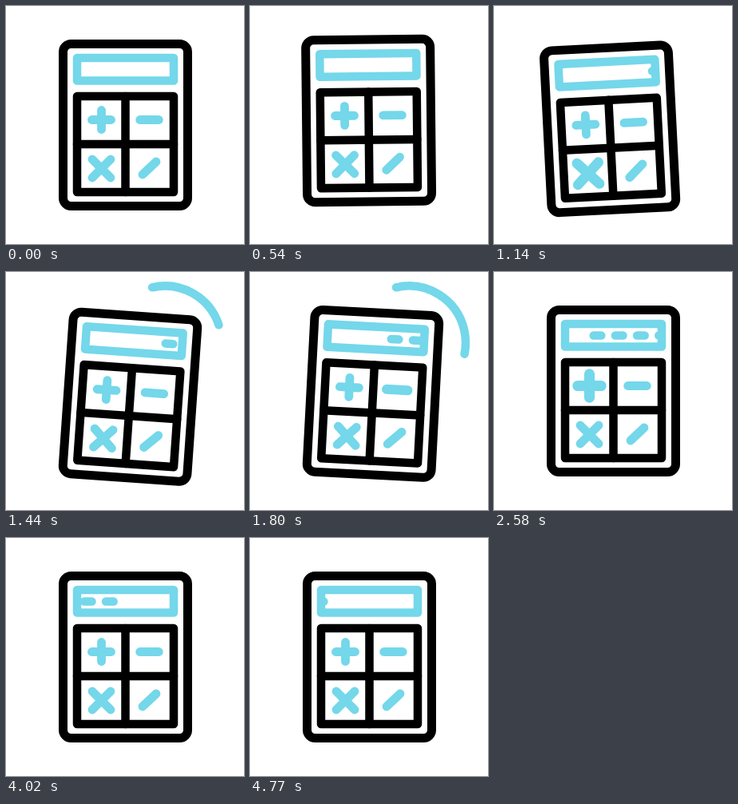
An HTML page with a canvas that plays this animation: 298x298 px, repeating every 5190 ms.

```html
<!DOCTYPE html>
<html lang="en">
<head>
<meta charset="utf-8">
<title>Calculator</title>
<style>
html, body { margin: 0; width: 100%; height: 100%; overflow: hidden; background: #fff; }
canvas { display: block; width: 298px; height: 298px; }
</style>
</head>
<body>
<canvas id="stage" width="298" height="298"></canvas>
<script>
const ctx = document.getElementById('stage').getContext('2d');
const LOOP = 5190, STEP = 30;
const CYAN = '#74d7ea', BLACK = '#000';
const PIVOT = { x: 149.5, y: 235 };

// [time, value] pairs
const TILT = [[360, 0], [840, -2.8], [980, -4], [1140, -2.9], [1440, 4], [1520, 4.7], [1800, 3], [1980, 1], [2130, 0]];
const LIFT = [[360, 0], [840, -21.5], [920, -23.5], [1140, 4.7], [1260, 6], [1480, 7], [1800, 3.3], [1980, 0.8], [2130, 0]];

const clamp = v => Math.max(0, Math.min(1, v));
const ease = v => v * v * (3 - 2 * v);
const progress = (t, from, to) => ease(clamp((t - from) / (to - from)));
const pulse = (t, peak, gain) => 1 + gain * (1 + Math.cos(Math.PI * Math.min(1, Math.abs(t - peak) / 230))) / 2;

// Slope at a key: flat at ends and extremes, harmonic mean elsewhere
function slope(keys, i) {
  if (i === 0 || i === keys.length - 1) return 0;
  const rate = k => (keys[k + 1][1] - keys[k][1]) / (keys[k + 1][0] - keys[k][0]);
  const a = rate(i - 1), b = rate(i);
  return a * b <= 0 ? 0 : 2 * a * b / (a + b);
}

function sample(keys, t) {
  const last = keys.length - 1;
  if (t <= keys[0][0]) return keys[0][1];
  if (t >= keys[last][0]) return keys[last][1];
  const i = keys.findIndex(k => k[0] > t) - 1;
  const [t0, v0] = keys[i], [t1, v1] = keys[i + 1];
  const span = t1 - t0, u = (t - t0) / span;
  return v0 + (v1 - v0) * ease(u)
    + span * u * (1 - u) * ((1 - u) * slope(keys, i) - u * slope(keys, i + 1));
}

function line(x1, y1, x2, y2) {
  ctx.beginPath();
  ctx.moveTo(x1, y1);
  ctx.lineTo(x2, y2);
  ctx.stroke();
}

function symbol(x, y, scale, draw) {
  ctx.save();
  ctx.translate(x, y);
  ctx.scale(scale, scale);
  draw();
  ctx.restore();
}

function drawBody() {
  ctx.strokeStyle = BLACK;
  ctx.lineWidth = 11;
  ctx.beginPath();
  ctx.roundRect(71.5, 47.5, 156, 203, 10);
  ctx.stroke();
  ctx.lineWidth = 10.5;
  ctx.strokeRect(89, 113, 121, 120);
  line(149.5, 113, 149.5, 233);
  line(89, 173, 210, 173);
}

function drawDisplay(t) {
  ctx.strokeStyle = CYAN;
  ctx.lineWidth = 10.5;
  ctx.save();
  ctx.beginPath();
  ctx.rect(93, 69, 113, 20);
  ctx.clip();
  const first = 129.5 - 0.0564 * (t - 2580);
  for (let i = 0; i < 4; i++) {
    const x = first + 27.2 * i;
    line(x - 4.8, 79.5, x + 4.8, 79.5);
  }
  ctx.restore();
  ctx.strokeRect(89, 65, 121, 28.5);
}

function drawSymbols(t) {
  ctx.lineWidth = 10.8;
  symbol(119.5, 142.5, pulse(t, 2570, 0.22), () => {
    line(-12, 0, 12, 0);
    line(0, -12, 0, 12);
  });
  symbol(179.5, 142.5, pulse(t, 1780, 0.12), () => line(-11.8, 0, 11.8, 0));
  symbol(119.5, 203.5, pulse(t, 1080, 0.2), () => {
    line(-11.5, -11.5, 11.5, 11.5);
    line(11.5, -11.5, -11.5, 11.5);
  });
  symbol(179.5, 203, pulse(t, 3045, 0.2), () => line(-8.5, 8, 8.5, -8));
}

function drawSwoosh(t) {
  const from = -103, sweep = 114.5;
  const head = progress(t, 1200, 1560), tail = progress(t, 1830, 2130);
  if (head <= tail) return;
  const angle = part => (from + sweep * part) * Math.PI / 180;
  ctx.strokeStyle = CYAN;
  ctx.lineWidth = 10.5;
  ctx.beginPath();
  ctx.arc(199, 88.5, 71, angle(tail), angle(head));
  ctx.stroke();
}

function render(t) {
  ctx.fillStyle = '#fff';
  ctx.fillRect(0, 0, 298, 298);
  ctx.lineCap = ctx.lineJoin = 'round';
  ctx.save();
  ctx.translate(PIVOT.x, PIVOT.y + sample(LIFT, t));
  ctx.rotate(sample(TILT, t) * Math.PI / 180);
  ctx.translate(-PIVOT.x, -PIVOT.y);
  drawBody();
  drawDisplay(t);
  drawSymbols(t);
  ctx.restore();
  drawSwoosh(t);
}

const start = performance.now();
function tick() {
  const t = (performance.now() - start) % LOOP;
  render(Math.floor(t / STEP) * STEP);
  requestAnimationFrame(tick);
}
tick();
</script>
</body>
</html>
```
